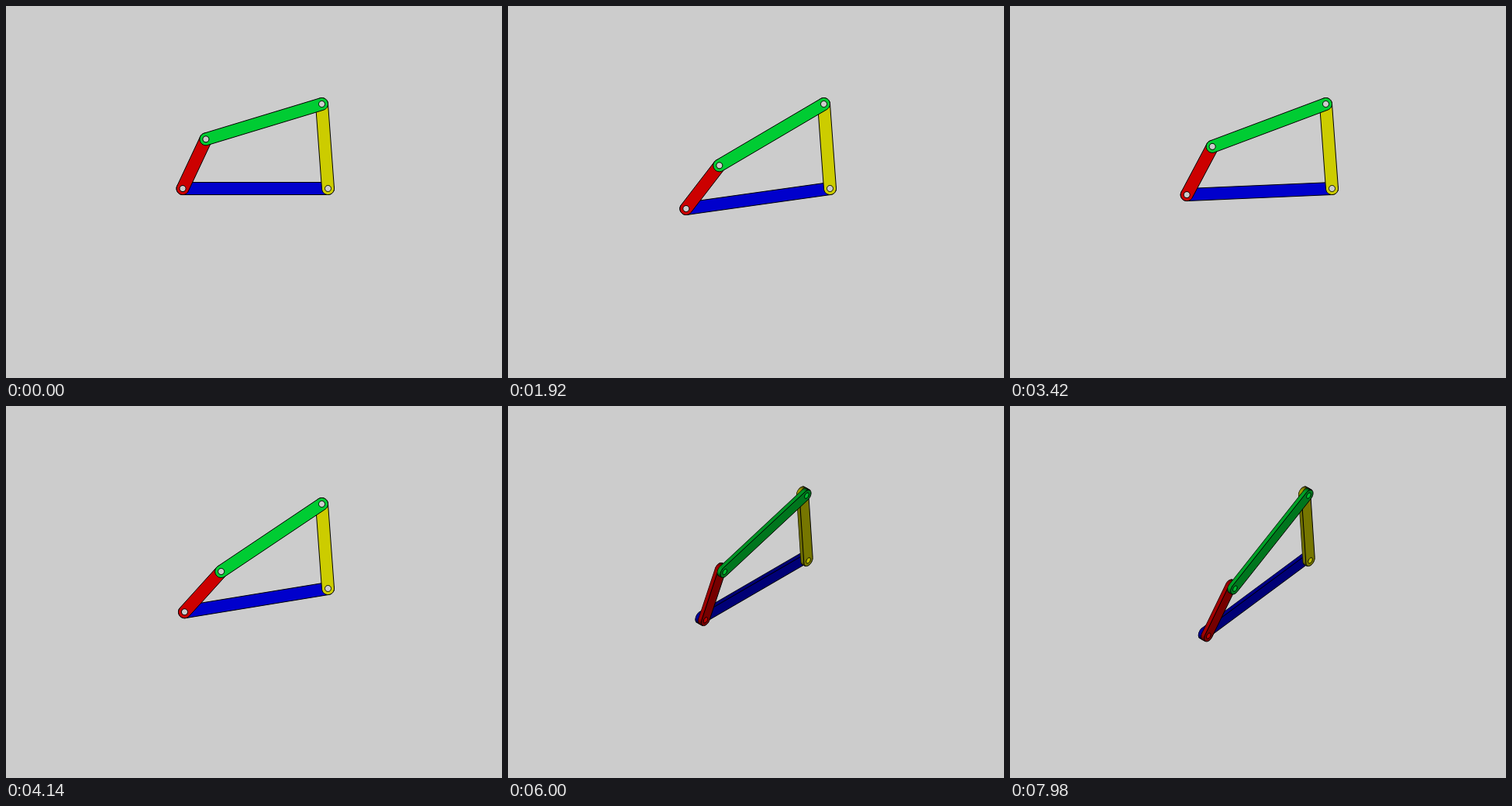
An HTML page with a canvas for the animation above (8000 ms loop, 640 by 480 pixels).

```html
<!DOCTYPE html>
<html lang="en">
<head>
<meta charset="utf-8">
<title>Four-bar linkage</title>
<style>
  html, body { margin: 0; width: 100%; height: 100%; overflow: hidden; background: #ccc; }
  canvas { display: block; }
</style>
</head>
<body>
<canvas id="stage" width="640" height="480"></canvas>
<script>
const ctx = document.getElementById('stage').getContext('2d');
const LOOP = 8000, STEP = 60;
const PERIOD = 2900, LOWEST = 40, SWING = 10;
const VIEW_START = 5360, VIEW_TIME = 240, HOLD = 270;
const BACKGROUND = '#cccccc';
const RADIUS = 8, HOLE = 4, THICK = 5;
const BLUE = [0, 0, 204], RED = [204, 0, 0], GREEN = [0, 204, 51], YELLOW = [204, 204, 0];

const basePivot = { x: 415.5, y: 235.5 };
const topPivot = { x: 407.5, y: 126.5 };
const blueLength = 187.5, redLength = 70.4, greenLength = 156.3;
const center = { x: 320, y: 251 };

const clamp = v => Math.max(0, Math.min(1, v));
const shade = (color, k) => `rgb(${color.map(c => Math.round(c * k)).join()})`;

function solveLinkage(time) {
  const phase = 2 * Math.PI * (time - LOWEST) / PERIOD;
  const swing = SWING * Math.PI / 180 * (1 - Math.cos(phase)) / 2;
  const crank = {
    x: basePivot.x - blueLength * Math.cos(swing),
    y: basePivot.y + blueLength * Math.sin(swing)
  };
  const dx = crank.x - topPivot.x, dy = crank.y - topPivot.y;
  const span = Math.hypot(dx, dy);
  const bend = Math.acos((span ** 2 + greenLength ** 2 - redLength ** 2) / (2 * span * greenLength));
  const angle = Math.atan2(dy, dx) + bend;
  return {
    crank,
    elbow: { x: topPivot.x + greenLength * Math.cos(angle), y: topPivot.y + greenLength * Math.sin(angle) }
  };
}

// Orthographic camera turning from the front view to the isometric one
function makeCamera(turn) {
  const yaw = turn * Math.PI / 4, pitch = turn * Math.atan(Math.SQRT1_2);
  const cy = Math.cos(yaw), sy = Math.sin(yaw), cp = Math.cos(pitch), sp = Math.sin(pitch);
  return {
    project(p, z) {
      const x = p.x - center.x, y = p.y - center.y;
      return [center.x + cy * x + sy * z, center.y - sy * sp * x + cp * y + cy * sp * z];
    },
    toward: [-sy * cp, -sp, cy * cp]
  };
}

function arc(c, radius, from, to, count) {
  return Array.from({ length: count + 1 }, (_, i) => {
    const a = from + (to - from) * i / count;
    return { x: c.x + radius * Math.cos(a), y: c.y + radius * Math.sin(a) };
  });
}

function trace(points) {
  ctx.beginPath();
  points.forEach(([x, y]) => ctx.lineTo(x, y));
  ctx.closePath();
}

function drawHole(camera, c, z, color) {
  const rim = arc(c, HOLE, 0, 2 * Math.PI, 24);
  const front = rim.map(p => camera.project(p, z));
  trace(front);
  ctx.fillStyle = shade(color, 0.9);
  ctx.fill();
  ctx.save();
  ctx.clip();
  trace(rim.map(p => camera.project(p, z - 2 * THICK)));
  ctx.fillStyle = BACKGROUND;
  ctx.fill();
  ctx.restore();
  trace(front);
  ctx.strokeStyle = '#000';
  ctx.lineWidth = 1;
  ctx.stroke();
}

function drawLink(camera, from, to, layer, color) {
  const a = Math.atan2(to.y - from.y, to.x - from.x), q = Math.PI / 2;
  const outline = [...arc(to, RADIUS, a - q, a + q, 16), ...arc(from, RADIUS, a + q, a + 3 * q, 16)];
  const z = layer * THICK;
  const front = outline.map(p => camera.project(p, z));
  const back = outline.map(p => camera.project(p, z - THICK));
  const [vx, vy, vz] = camera.toward;
  const sides = [];

  outline.forEach((p, i) => {
    const j = (i + 1) % outline.length, next = outline[j];
    const ex = next.x - p.x, ey = next.y - p.y;
    const light = (ey * vx - ex * vy) / Math.hypot(ex, ey);
    if (light > 0.001) sides.push({ light, quad: [front[i], front[j], back[j], back[i]] });
  });

  ctx.lineJoin = 'round';
  ctx.strokeStyle = '#000';
  ctx.lineWidth = 1.5;
  for (const { quad } of sides) {
    trace(quad);
    ctx.stroke();
  }
  for (const { quad, light } of sides) {
    trace(quad);
    ctx.fillStyle = ctx.strokeStyle = shade(color, light);
    ctx.lineWidth = 0.4;
    ctx.fill();
    ctx.stroke();
  }

  trace(front);
  ctx.fillStyle = shade(color, vz);
  ctx.strokeStyle = '#000';
  ctx.lineWidth = 1;
  ctx.fill();
  ctx.stroke();

  for (const end of [from, to]) drawHole(camera, end, z, color);
}

function draw(time) {
  // The linkage rests while the camera turns
  const motionTime = time - Math.max(0, Math.min(HOLD, time - VIEW_START));
  const { crank, elbow } = solveLinkage(motionTime);
  const camera = makeCamera(clamp((time - VIEW_START) / VIEW_TIME));
  ctx.fillStyle = BACKGROUND;
  ctx.fillRect(0, 0, 640, 480);
  drawLink(camera, basePivot, crank, -1, BLUE);
  drawLink(camera, topPivot, basePivot, 0, YELLOW);
  drawLink(camera, crank, elbow, 0, RED);
  drawLink(camera, elbow, topPivot, 1, GREEN);
}

const startTime = performance.now();
function tick() {
  const time = (performance.now() - startTime) % LOOP;
  draw(Math.floor(time / STEP) * STEP);
  requestAnimationFrame(tick);
}
tick();
</script>
</body>
</html>
```
